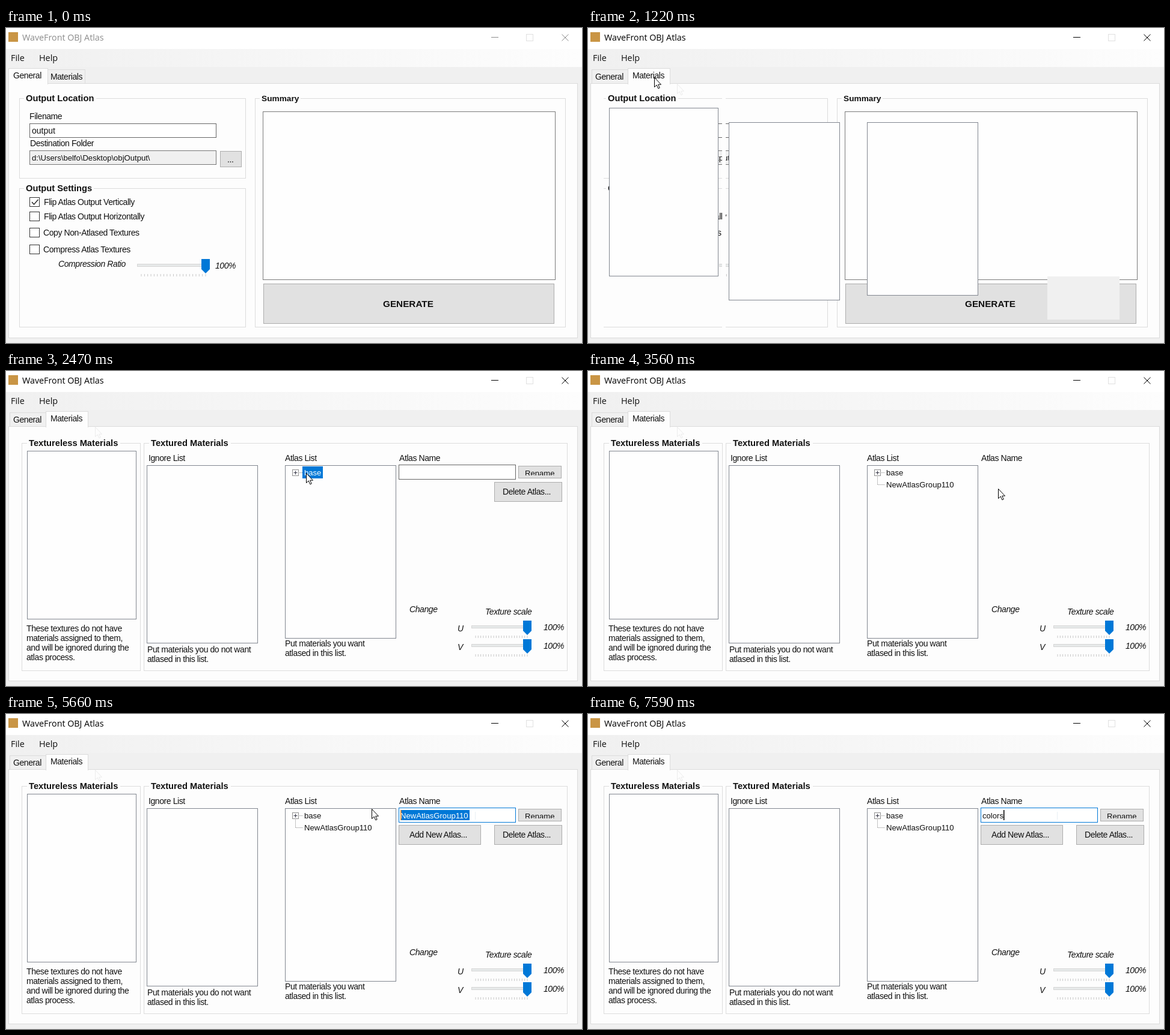
Write an HTML page that moves like this. It is 958 px wide and 525 px high and loops after 8000 ms.

```html
<!DOCTYPE html>
<html lang="en">
<head>
<meta charset="utf-8">
<title>Atlas window</title>
<style>
html, body { margin: 0; width: 100%; height: 100%; overflow: hidden; background: #f0f0f0; }
svg { display: block; width: 100vw; height: 100vh; }
text { font: 14px "Liberation Sans", Arial, sans-serif; letter-spacing: -.42px; fill: #111; white-space: pre; }
.bold { font-weight: bold; font-size: 14.7px; letter-spacing: 0; }
.it { font-style: italic; }
.entry { font-size: 13.1px; letter-spacing: 0; }
.ui { font-family: "Open Sans", sans-serif; font-size: 14.4px; letter-spacing: 0; }
.white { fill: #fff; }
</style>
</head>
<body>
<svg id="stage" viewBox="0 0 958 525"></svg>
<script>
const BLUE = '#0078d7', PAGE = '#fdfdfd', FACE = '#e1e1e1', EDGE = '#dcdcdc';

// Boxes are given by their outermost pixel columns and rows.
const box = (l, t, r, b, fill, stroke = 'none', id = '') =>
  `<rect ${id && `id="${id}"`} x="${l + .5}" y="${t + .5}" width="${r - l}" height="${b - t}" fill="${fill}" stroke="${stroke}"/>`;
const fill = (x, y, w, h, color, id = '') =>
  `<rect ${id && `id="${id}"`} x="${x}" y="${y}" width="${w}" height="${h}" fill="${color}"/>`;
const text = (x, y, s, cls = '', extra = '') => `<text x="${x}" y="${y}" class="${cls}" ${extra}>${s}</text>`;
const line = (d, color, extra = '') => `<path d="${d}" fill="none" stroke="${color}" ${extra}/>`;
const group = (id, ...parts) => `<g id="${id}">${parts.join('')}</g>`;
const button = (l, t, r, b, id) => box(l, t, r, b, FACE, '#adadad', id);
const list = (l, t, r, b) => box(l, t, r, b, '#fefefe', '#828790');
const lines = (x, y, ...rows) => rows.map((s, i) => text(x, y + 16 * i, s)).join('');

const frame = (l, t, r, b, title, tx, tw, extra) =>
  box(l, t, r, b, 'none', EDGE) + fill(tx - 3, t - 2, tw + 6, 5, PAGE) + text(tx, t + 5, title, 'bold', extra);

const tab = (l, r, active, x, name) => active
  ? box(l, 67, r, 93, PAGE, EDGE) + fill(l + 1, 92, r - l - 1, 3, PAGE) + text(x, 84, name)
  : box(l, 69, r, 92, '#f0f0f0', EDGE) + text(x, 86, name);

function slider(l, r, y) {
  const step = (r - l - 14) / 20;
  let ticks = '';
  for (let i = 0; i <= 20; i++) ticks += `M${l + 7 + i * step} ${y + 25}v4`;
  return box(l, y + 8, r - 1, y + 12, '#e7eaea', '#d6d6d6') + line(ticks, '#c8c8c8') +
    `<path d="M${r - 14} ${y}h14v17l-7 7l-7 -7z" fill="${BLUE}"/>`;
}

const check = (y, x, label, on) =>
  box(39, y, 55, y + 15, '#fff', '#333') + text(x, y + 13, label) +
  (on ? line(`M43 ${y + 8}l3.5 4l7 -8`, '#222', 'stroke-width="1.4"') : '');

const arrow = 'M.5 .5V16.5L4.2 13L6.8 18.8L9.2 17.8L6.7 12.2H11.5Z';

const chrome = fill(0, 0, 958, 525, '#f0f0f0') + fill(0, 0, 958, 35, '#fff') +
  `<linearGradient id="menu"><stop stop-color="#f0f0f0"/><stop offset="1" stop-color="#fdfdfd"/></linearGradient>` +
  fill(0, 35, 958, 30, 'url(#menu)') +
  fill(4, 7, 16, 16, '#c99545') +
  group('title',
    text(27, 21, 'WaveFront OBJ Atlas', 'ui', 'style="font-size:14.3px;fill:currentColor"'),
    line('M807 15.5h12M924.5 10.5l11 11M935.5 10.5l-11 11', 'currentColor')) +
  box(865, 10, 876, 21, 'none', '#e0e0e0') +
  text(8, 55, 'File', 'ui') + text(55, 55, 'Help', 'ui') +
  box(4, 92, 950, 516, PAGE, EDGE);

const general = group('general',
  frame(22, 117, 398, 250, 'Output Location', 33, 114),
  text(39, 152, 'Filename'),
  box(39, 159, 349, 182, '#fff', '#666'),
  text(43, 176, 'output', 'entry', 'style="font-size:14px"'),
  text(40, 197, 'Destination Folder'),
  box(39, 204, 349, 227, '#f0f0f0', '#777'),
  text(43, 221, String.raw`d:\Users\belfo\Desktop\objOutput\ `, 'entry'),
  button(356, 205, 391, 231), text(368, 224, '...'),
  frame(22, 267, 398, 498, 'Output Settings', 33, 110),
  check(282, 63, 'Flip Atlas Output Vertically', true),
  check(306, 63, 'Flip Atlas Output Horizontally'),
  check(333, 62, 'Copy Non-Atlased Textures'),
  check(361, 62, 'Compress Atlas Textures'),
  text(87, 398, 'Compression Ratio', 'it'),
  slider(218, 339, 385),
  text(348, 401, '100%', 'it'),
  frame(414, 117, 930, 498, 'Summary', 425, 62, 'style="font-size:13.7px"'),
  box(427, 139, 913, 419, '#fefefe', '#7a7a7a'),
  button(428, 426, 911, 492),
  text(627, 465, 'GENERATE', 'bold', 'style="font-size:15.3px"'));

// Half-painted page while the tabs are being swapped.
const wipe = group('wipe',
  fill(20, 100, 6, 402, PAGE), fill(223, 100, 6, 402, PAGE), fill(764, 414, 120, 72, '#f0f0f0'));

const lists = group('lists',
  list(35, 133, 216, 413), list(234, 157, 418, 453), list(464, 157, 648, 445));

const materials = group('materials',
  frame(26, 120, 223, 499, 'Textureless Materials', 38, 149),
  frame(229, 120, 933, 499, 'Textured Materials', 241, 130),
  text(237, 150, 'Ignore List'), text(464, 150, 'Atlas List'), text(654, 150, 'Atlas Name'),
  lines(34, 434, 'These textures do not have', 'materials assigned to them,',
    'and will be ignored during the', 'atlas process.'),
  lines(235, 469, 'Put materials you do not want', 'atlased in this list.'),
  lines(464, 459, 'Put materials you want', 'atlased in this list.'),
  text(671, 402, 'Change', 'it'), text(797, 406, 'Texture scale', 'it'),
  ...[0, 31].map((dy, i) => text(751, 434 + dy, 'UV'[i], 'it') + slider(774, 874, 416 + dy) +
    text(894, 432 + dy, '100%', 'it')));

const tree = group('tree',
  box(476, 164, 486, 174, '#fff', '#919191'),
  line('M478.5 169.5h6M481.5 166.5v6', '#334'),
  line('M488 169.5h5', '#888', 'stroke-dasharray="1"'),
  fill(493, 159, 34, 20, BLUE, 'baseMark'),
  text(496, 174, 'base', 'entry', 'id="baseName"'),
  group('newNode',
    line('M481.5 176v13.5h12', '#888', 'stroke-dasharray="1"'),
    fill(493, 179, 119, 20, BLUE, 'newMark'),
    text(496, 194, 'NewAtlasGroup110', 'entry', 'id="newName"')));

const fields = group('fields',
  box(653, 156, 847, 180, '#fff', '#666', 'nameBox'),
  text(656, 174, '', 'entry', 'id="name"'),
  fill(656, 160, 115, 17, BLUE, 'mark'),
  `<clipPath id="markClip">${fill(656, 160, 115, 17, '#000', 'markArea')}</clipPath>`,
  text(656, 174, 'NewAtlasGroup110', 'entry white', 'id="marked" clip-path="url(#markClip)"'),
  fill(656, 160, 1.5, 17, '#000', 'caret'),
  button(852, 158, 923, 178), text(863, 175, 'Rename', 'entry'), fill(854, 174, 68, 4, FACE),
  button(812, 185, 924, 217), text(826, 206, 'Delete Atlas...'),
  group('add', button(653, 185, 789, 217, 'addFace'), text(671, 206, 'Add New Atlas...')));

const pointers =
  `<path id="trace" transform="translate(148 93)" d="${arrow}" fill="none" stroke="#ececec"/>` +
  `<path id="beamTrace" d="M780.5 163v13" stroke="#e8eef4"/>` +
  `<path id="arrow" d="${arrow}" fill="#fff" stroke="#000"/>` +
  `<path id="beam" d="M-3 -8.5h2.5v17h-2.5M3 -8.5h-2.5M3 8.5h-2.5" fill="none" stroke="#333"/>`;

const stage = document.getElementById('stage');
stage.innerHTML = chrome +
  group('tabsGeneral', tab(69, 131, false, 74, 'Materials'), tab(4, 69, true, 12, 'General')) +
  group('tabsMaterials', tab(6, 66, false, 12, 'General'), tab(66, 136, true, 74, 'Materials')) +
  general + wipe + materials + lists + tree + fields + pointers;

const el = {};
stage.querySelectorAll('[id]').forEach(e => el[e.id] = e);
const show = (id, on) => el[id].style.display = on ? '' : 'none';
const set = (id, key, value) => el[id].setAttribute(key, value);

// Pointer stops: time, x, y
const path = [
  [460, 330, 524], [1000, 149, 94], [1140, 110, 82], [1320, 110, 82], [1620, 428, 134],
  [1700, 428, 134], [2160, 499, 170], [2500, 499, 170], [2950, 682, 196], [3820, 682, 196],
  [4110, 436, 186], [4330, 520, 189], [4410, 560, 188], [4570, 623, 163], [4680, 634, 163],
  [5040, 781, 169], [5200, 781, 169], [5660, 608, 158], [5810, 603, 152], [5900, 603, 152],
  [6200, 479, 187]
];
const keys = [7050, 7130, 7280, 7430, 7510, 7590];

function pointer(t) {
  const i = path.findIndex(p => p[0] > t);
  if (i < 0) return path[path.length - 1].slice(1);
  if (!i) return path[0].slice(1);
  const [t0, x0, y0] = path[i - 1], [t1, x1, y1] = path[i];
  const u = (t - t0) / (t1 - t0), k = u * u * (3 - 2 * u);
  return [x0 + (x1 - x0) * k, y0 + (y1 - y0) * k].map(Math.round);
}

function draw(t) {
  const within = (a, b) => t >= a && t < b;
  const [x, y] = pointer(t);

  el.title.style.color = t < 1140 ? '#8c8c8c' : '#000';
  show('tabsGeneral', t < 1220);
  show('tabsMaterials', t >= 1220);
  show('general', t < 1320);
  show('wipe', within(1220, 1320));
  show('lists', t >= 1220);
  show('materials', t >= 1320);

  const baseOn = within(2390, 3560), newOn = within(4330, 5270);
  show('tree', t >= 1320);
  show('baseMark', baseOn);
  el.baseName.classList.toggle('white', baseOn);
  show('newNode', t >= 3560);
  show('newMark', newOn);
  el.newName.classList.toggle('white', newOn);

  const focus = t >= 5270, selecting = within(5270, 7050);
  const typed = keys.filter(k => t >= k).length;
  show('fields', within(2470, 3560) || t >= 4410);
  show('add', within(2540, 3560) || t >= 4490);
  set('addFace', 'fill', within(3480, 3560) ? '#cce4f7' : FACE);
  set('addFace', 'stroke', within(3480, 3560) ? '#005499' : '#adadad');
  set('nameBox', 'stroke', focus ? BLUE : within(4800, 5270) ? '#222' : '#666');
  el.name.textContent = typed ? 'colors'.slice(0, typed)
    : t >= 4490 ? 'NewAtlasGroup110' : within(2540, 3560) ? 'base' : '';

  const left = Math.max(656, Math.min(771, x));
  for (const id of ['mark', 'markArea']) {
    set(id, 'x', left);
    set(id, 'width', 771 - left);
  }
  show('mark', selecting);
  show('marked', selecting);
  show('caret', focus && !within(6200, 6730));
  set('caret', 'x', typed ? 656 + Math.round(el.name.getComputedTextLength()) : left);
  set('caret', 'fill', selecting ? '#ff8728' : '#000');

  const visible = within(460, 7050);
  const inField = t > 4600 && x > 653 && x < 847 && y > 156 && y < 180;
  show('trace', t >= 1080);
  show('beamTrace', t >= 5350);
  show('arrow', visible && !inField);
  show('beam', visible && inField);
  for (const id of ['arrow', 'beam']) set(id, 'transform', `translate(${x} ${y})`);
}

function tick() {
  draw(performance.now() % 8000);
  requestAnimationFrame(tick);
}
tick();
</script>
</body>
</html>
```
